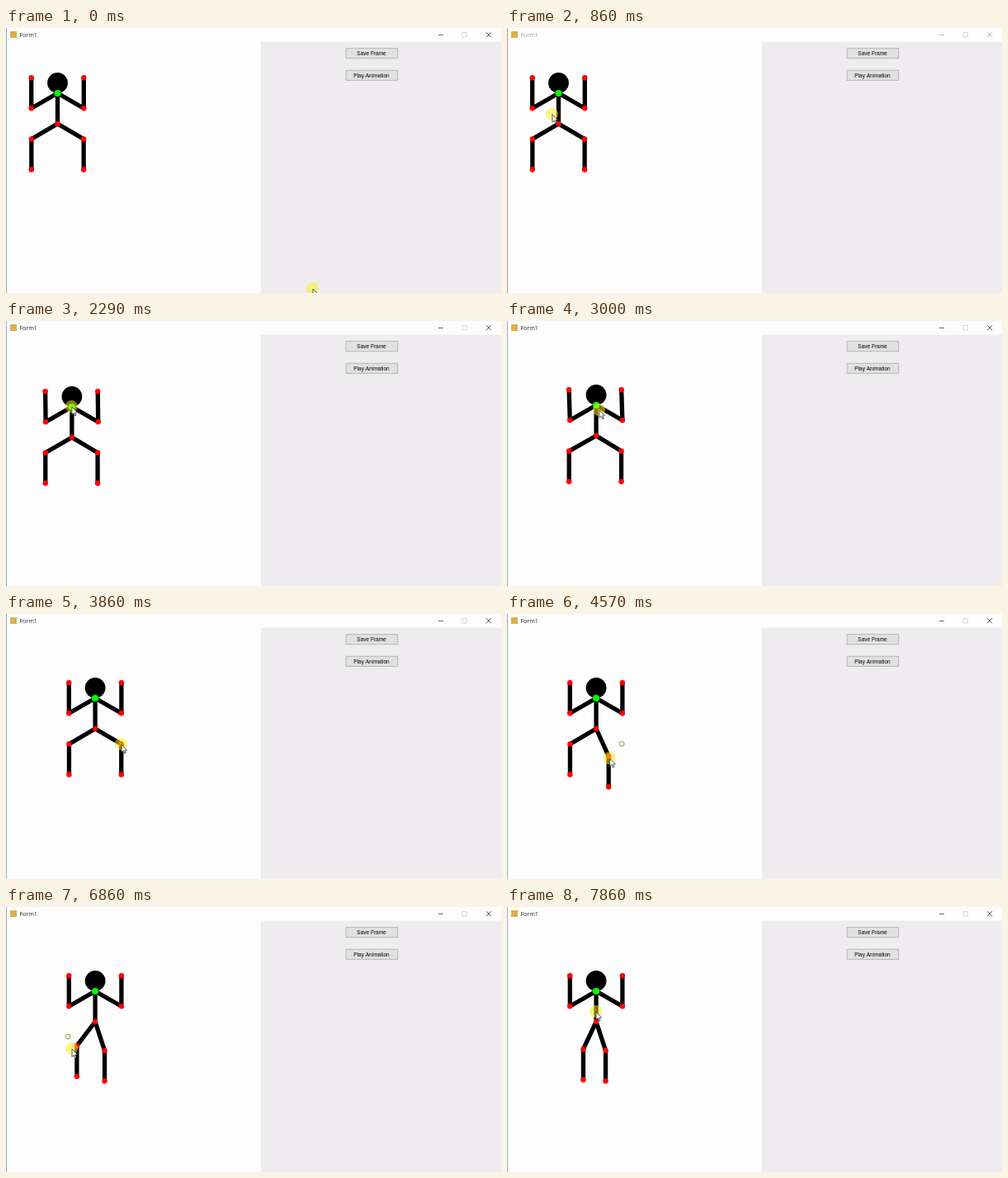
An HTML page with a canvas for the animation above (8 s loop, 600 px wide and 321 px high).

```html
<!DOCTYPE html>
<html lang="en">
<head>
<meta charset="utf-8">
<title>Stick figure editor</title>
<style>
  html, body { margin: 0; width: 600px; height: 321px; overflow: hidden; background: #fefdfe; }
  canvas { display: block; }
</style>
</head>
<body>
<canvas id="stage" width="600" height="321"></canvas>
<script>
const ctx = document.getElementById('stage').getContext('2d');
const LOOP = 8000, FPS = 7, THIGH = 36.7, BONE = 37;

// Pointer stops: tick (1/7 s), x, y
const TO_NECK = [[0, 372, 316], [3, 54, 108], [5, 54, 108], [9.5, 61.5, 81]];
const TO_LEGS = [
  [20, 108, 103], [25, 146, 150], [27, 140, 158], [33.6, 122, 178], [35, 122, 178],
  [37.5, 106, 196], [41, 72, 158], [47, 75, 163], [48, 80, 172], [52, 91, 178],
  [54, 91, 178], [55, 108, 127]
];

const clamp = u => Math.min(1, Math.max(0, u));
const part = (tick, from, to) => clamp((tick - from) / (to - from));
const smooth = (tick, from, to) => {
  const u = part(tick, from, to);
  return u * u * (3 - 2 * u);
};
const easeOut = (tick, from, to) => 1 - (1 - part(tick, from, to)) ** 4;

function glide(stops, tick) {
  let [, x, y] = stops[0];
  for (let i = 1; i < stops.length; i++) {
    const u = smooth(tick, stops[i - 1][0], stops[i][0]);
    x += (stops[i][1] - stops[i - 1][1]) * u;
    y += (stops[i][2] - stops[i - 1][2]) * u;
  }
  return [x, y];
}

const carry = tick => smooth(tick, 13.1, 20);
const neckAt = tick => [
  62.5 + 45.6 * carry(tick),
  79 + 25 * smooth(tick, 13, 16) - 2 * smooth(tick, 18, 20)
];

function pointerAt(tick) {
  if (tick < 12) return glide(TO_NECK, tick);
  return tick < 20 ? neckAt(tick) : glide(TO_LEGS, tick);
}

function box(x, y, w, h, fill) {
  ctx.fillStyle = fill;
  ctx.fillRect(x, y, w, h);
}

function disc([x, y], r, fill) {
  ctx.fillStyle = fill;
  ctx.beginPath();
  ctx.arc(x, y, r, 0, Math.PI * 2);
  ctx.fill();
}

function line(points, color, width, closed) {
  ctx.strokeStyle = color;
  ctx.lineWidth = width;
  ctx.beginPath();
  points.forEach(p => ctx.lineTo(...p));
  if (closed) ctx.closePath();
  ctx.stroke();
}

function label(text, x, y, font, color, align) {
  ctx.font = font;
  ctx.textAlign = align;
  ctx.fillStyle = color;
  ctx.fillText(text, x, y);
}

function button(y, text) {
  box(411.7, y, 63.5, 13, '#b2b2b2');
  box(412.6, y + 0.9, 61.7, 11.2, '#e1e1e1');
  label(text, 443, y + 9, '6.5px "Liberation Sans", Arial, sans-serif', '#000', 'center');
}

function drawWindow(active) {
  const ink = active ? '#222' : '#999';
  box(0, 0, 600, 321, '#fefdfe');
  box(309, 16.6, 291, 305, '#eeecee');
  box(0, 0, 0.9, 321, active ? '#7da7cb' : '#b18784');
  box(5, 4, 8, 8, '#d8b24c');
  label('Form1', 16.4, 11, '7.1px "Open Sans", sans-serif', ink, 'left');
  line([[524, 8.4], [530, 8.4]], ink, 0.7);
  line([[553, 5.5], [558.5, 5.5], [558.5, 11], [553, 11]], '#d0d0d0', 0.8, true);
  line([[582, 5.2], [588, 11.2]], ink, 0.8);
  line([[588, 5.2], [582, 11.2]], ink, 0.8);
  button(24.2, 'Save Frame');
  button(50.8, 'Play Animation');
}

function drawFigure(tick) {
  const neck = neckAt(tick);
  const at = (x, y) => [neck[0] + x, neck[1] + y];
  const hip = at(0, BONE), joints = [hip];
  const limbs = [[neck, hip]];
  // Outer joints trail the neck until a leg is grabbed.
  const lag = tick < 27 ? -1.2 * carry(tick) : 0;
  const leftFold = easeOut(tick, 46.8, 52), rightFold = smooth(tick, 27, 33.6);

  for (const side of [-1, 1]) {
    const degrees = 59.6 - (side < 0 ? 34.4 * leftFold : 41.4 * rightFold);
    const a = degrees * Math.PI / 180;
    const elbow = at(side * 31.8, 18.3), hand = at(side * 31.8 + lag, 18.3 - BONE);
    const kx = side * THIGH * Math.sin(a) + lag, ky = BONE + THIGH * Math.cos(a);
    const knee = at(kx, ky), foot = at(kx, ky + BONE);
    limbs.push([neck, elbow, hand], [hip, knee, foot]);
    joints.push(elbow, hand, knee, foot);
  }
  ctx.lineJoin = ctx.lineCap = 'round';
  limbs.forEach(l => line(l, '#000', 5.3));
  ctx.lineCap = 'butt';
  ctx.lineJoin = 'miter';
  disc(at(0, -12.5), 12.4, '#000');
  joints.forEach(j => disc(j, 3.2, '#f00'));
  disc(neck, 4.1, '#0f0');
}

function drawRing(x, y) {
  ctx.strokeStyle = '#93992f';
  ctx.lineWidth = 1;
  ctx.beginPath();
  ctx.arc(x, y, 3, 0, Math.PI * 2);
  ctx.stroke();
}

function drawPointer(tick) {
  const [x, y] = pointerAt(tick);
  disc([x - 0.5, y - 0.5], 7.6, 'rgba(250, 242, 20, 0.52)');
  const arrow = [[0, 0], [0, 9.5], [2.2, 7.5], [3.8, 11], [5.2, 10.4], [3.7, 7], [6.6, 7]]
    .map(([dx, dy]) => [x + dx, y + dy]);
  ctx.fillStyle = '#fff';
  ctx.beginPath();
  arrow.forEach(p => ctx.lineTo(...p));
  ctx.fill();
  line(arrow, '#333', 0.8, true);
}

function frame(now) {
  const tick = Math.min(55, Math.floor((now % LOOP + 5) * FPS / 1000));
  drawWindow(tick < 1 || tick > 11);
  drawFigure(tick);
  if (tick >= 28 && tick < 34) drawRing(139, 157.3);
  if (tick >= 46 && tick < 52) drawRing(75, 157);
  drawPointer(tick);
  requestAnimationFrame(t => frame(Math.max(0, t - start)));
}

const start = performance.now();
frame(0);
</script>
</body>
</html>
```
